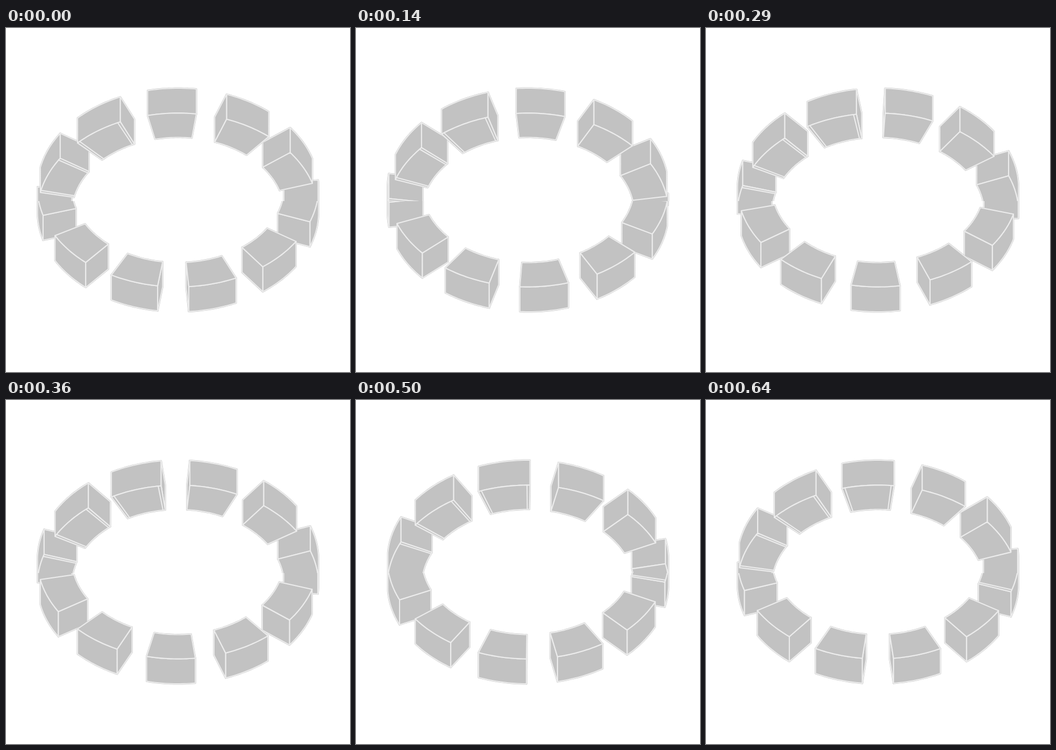
Animation of 640 by 640 pixels, one loop 0.71 s. Source, as an HTML page with a canvas:

```html
<!DOCTYPE html>
<html lang="en">
<head>
<meta charset="utf-8">
<title>Impossible ring</title>
<style>
  html, body { margin: 0; width: 100%; height: 100%; overflow: hidden; background: #fff; }
  canvas { display: block; width: 640px; height: 640px; }
</style>
</head>
<body>
<canvas id="stage" width="640" height="640"></canvas>
<script>
const ctx = document.getElementById('stage').getContext('2d');

const LOOP = 710;
// [start in ms, rotation in seventeenths of the block spacing]
const STEPS = [[0, 0], [70, 2], [140, 4], [210, 6], [290, 8],
               [360, 9], [430, 11], [500, 13], [570, 14], [640, 16]];

const SPACING = 360 / 11, WIDTH = 20;
const PAD = 0.7, INSET = 0.5;   // rim of the double-edged blocks, in degrees
const OUTER = 261.4, INNER = 197.5, TILT = Math.SQRT1_2, HEIGHT = 46.4;
const CX = 320, CY = 320 - HEIGHT / 2, CUT = 322;
const FILL = '#c2c2c2', LINE = '#ececec', HALO = '#c6c6c6';
const LINE_WIDTH = 2.1, HALO_WIDTH = 3;

function point(r, deg, drop = 0) {
  const a = deg * Math.PI / 180;
  return [CX + r * Math.sin(a), CY + r * TILT * Math.cos(a) + drop];
}

function arc(r, from, to, drop = 0) {
  const n = 16;
  return Array.from({ length: n + 1 }, (_, i) => point(r, from + (to - from) * i / n, drop));
}

function shape(points) {
  const path = new Path2D();
  points.forEach(p => path.lineTo(...p));
  path.closePath();
  return path;
}

function stroke(path, color, width) {
  ctx.strokeStyle = color;
  ctx.lineWidth = width;
  ctx.stroke(path);
}

function endFace(deg) {
  return shape([point(OUTER, deg), point(INNER, deg),
                point(INNER, deg, HEIGHT), point(OUTER, deg, HEIGHT)]);
}

function block(from, doubled) {
  const to = from + WIDTH;
  return doubled
    ? { from: from - PAD, to: to + PAD, seams: [from + INSET, to - INSET] }
    : { from, to, seams: [] };
}

// One block seen from above, between two angles measured from the front
function drawBlock({ from, to, seams }) {
  const faces = [];
  const a = Math.max(from, -90), b = Math.min(to, 90);
  if (a < b) faces.push(shape([...arc(OUTER, a, b), ...arc(OUTER, b, a, HEIGHT)]));
  if (from > 0) faces.push(endFace(from));
  if (to < 0) faces.push(endFace(to));
  faces.push(shape([...arc(OUTER, from, to), ...arc(INNER, to, from)]));

  faces.forEach(f => stroke(f, HALO, HALO_WIDTH));
  for (const f of faces) {
    ctx.fillStyle = FILL;
    ctx.fill(f);
    stroke(f, LINE, LINE_WIDTH);
  }
  for (const deg of seams) {
    stroke(shape([point(OUTER, deg), point(INNER, deg)]), LINE, LINE_WIDTH);
  }
}

function drawHalf(blocks, clipTop, clipBottom, flip) {
  ctx.save();
  ctx.beginPath();
  ctx.rect(0, clipTop, 640, clipBottom - clipTop);
  ctx.clip();
  if (flip) ctx.transform(1, 0, 0, -1, 0, 640);
  const depth = b => Math.abs(b.from + b.to);
  blocks.sort((p, q) => depth(q) - depth(p)).forEach(drawBlock);
  ctx.restore();
}

function draw(turn) {
  ctx.clearRect(0, 0, 640, 640);
  ctx.lineJoin = 'round';
  const lower = [], upper = [];
  for (let k = -4; k <= 4; k++) {
    lower.push(block(4.4 + SPACING * k - turn, k >= 3));
    upper.push(block((k < 0 ? -12.2 : -12.5) + SPACING * k + turn, k < 0));
  }
  drawHalf(lower, CUT, 640, false);
  drawHalf(upper, 0, CUT, true);
}

const start = performance.now();
let shown = -1;

function tick() {
  const t = (performance.now() - start) % LOOP;
  const step = STEPS.filter(s => s[0] <= t).pop()[1];
  if (step !== shown) {
    shown = step;
    draw(step * SPACING / 17);
  }
  requestAnimationFrame(tick);
}
tick();
</script>
</body>
</html>
```
